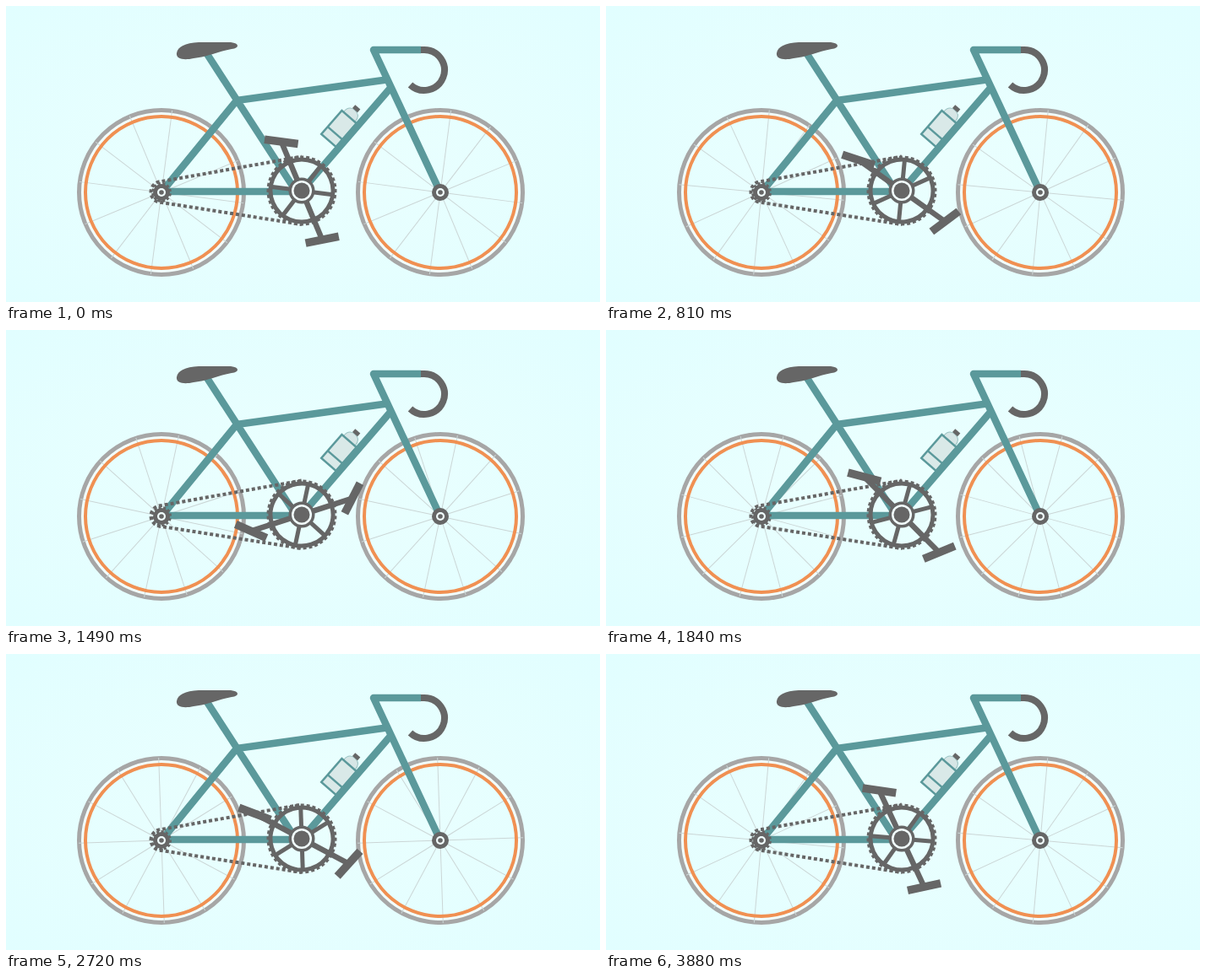
Animation of 703 by 351 pixels, one loop 3930 ms. Source, as an HTML page:

```html
<!DOCTYPE html>
<html lang="en">
<head>
<meta charset="utf-8">
<title>Bicycle</title>
<style>
  html, body { margin: 0; width: 100%; height: 100%; overflow: hidden; }
  body { background: radial-gradient(#ebfffe, #e1feff); }
  svg { display: block; width: 100%; height: 100%; fill: none; }
  .dark { stroke: #666; }
  .teal { stroke: #5b999b; stroke-width: 8.5; }
  .fill { fill: #666; }
  .pale { fill: #f2ffff; }
</style>
</head>
<body>
<svg viewBox="0 0 703 351">
  <defs>
    <g id="tyre">
      <circle r="93.5" stroke="#f2fffe" stroke-width="4"/>
      <circle r="97.5" stroke="#a6a6a6" stroke-width="5"/>
    </g>
    <circle id="rim" r="90" stroke="#f09052" stroke-width="4"/>
    <g id="hub">
      <circle class="fill" r="10"/>
      <circle class="pale" r="5"/>
      <circle class="fill" r="2.8"/>
    </g>
  </defs>

  <g id="rear" transform="translate(184 221)">
    <use href="#tyre"/><g class="spokes"></g><use href="#rim"/>
  </g>
  <g id="front" transform="translate(514 221)">
    <use href="#tyre"/><g class="spokes"></g><use href="#rim"/>
  </g>

  <g transform="translate(394 145.5) rotate(41)" stroke="#5b999b">
    <path d="M-9-19C-9-26-5-29 0-29S9-26 9-19Z" fill="#d6e6e6" stroke="#9cc3c3"/>
    <rect x="-11.5" y="-18.5" width="23" height="37" fill="#d9e9e8" stroke-width="2.5"/>
    <path d="M-12 7H12" stroke-width="2.5"/>
    <rect class="fill" x="-4" y="-34" width="8" height="5" stroke="none"/>
  </g>

  <g class="teal">
    <path d="M238 57L344 221M184 220H350M184 221L273 112L450 87.5M350 219L456 96"/>
    <path d="M491 52H435L514 221" stroke-linejoin="round"/>
  </g>
  <path class="dark" d="M491 52H495A24 24 0 1 1 478.5 93.5" stroke-width="8"/>
  <path class="fill" d="M202 56C203 48 212 44 228 43H266Q274 44 274 47Q274 50 267 51C250 54 240 60 222 62C209 65 201 62 202 56Z"/>

  <path id="chain" class="dark" d="M350 259L184 233A12.5 12.5 0 0 1 184 208L350 178.5" stroke-width="4" stroke-dasharray="4 2.98"/>
  <use href="#hub" x="514" y="221"/>
  <g transform="translate(184 221)">
    <circle id="cog" class="dark" r="10.5" stroke-width="3" stroke-dasharray="3 2.5" pathLength="66"/>
    <use href="#hub"/>
  </g>

  <g transform="translate(350 219)">
    <g id="crank" class="dark">
      <circle r="39.5" stroke-width="4" pathLength="252" stroke-dasharray="4 3"/>
      <circle r="37" stroke-width="5"/>
      <g id="arms" stroke-width="5"></g>
      <path d="M0-63V63" stroke-width="6.5"/>
    </g>
    <circle class="fill" r="15.5"/>
    <circle class="pale" r="12"/>
    <circle class="fill" r="9.5"/>
    <rect class="pedal fill" x="-20" y="-4.75" width="40" height="9.5"/>
    <rect class="pedal fill" x="-20" y="-4.75" width="40" height="9.5"/>
  </g>
</svg>
<script>
const LOOP = 3930, FIRST = 67, STEP = 48.85;
const START = -22.6, SPEED = 0.1851; // degrees, degrees per ms
const RAD = Math.PI / 180;
const $ = id => document.getElementById(id);
const spokes = [...document.querySelectorAll('.spokes')];
const pedals = [...document.querySelectorAll('.pedal')];

const rays = (count, from, to) => Array.from({ length: count }, (_, i) =>
  `<path d="M0 ${-from}V${-to}" transform="rotate(${i * 360 / count})"/>`).join('');

for (const g of spokes) {
  g.setAttribute('stroke', '#cbd6d6');
  g.innerHTML = rays(12, 8, 98);
}
$('arms').innerHTML = rays(6, 13, 37);

const turn = (el, angle) => el.setAttribute('transform', `rotate(${angle})`);

// Pedal tilt follows how far the arm leans forwards or backwards.
function tilt(angle) {
  const u = (angle % 360 + 360) % 360;
  const lean = 90 - Math.abs(u % 180 - 90);
  if (u >= 180) return lean / 3;
  return lean < 45 ? -lean / 2 : -22.5 - (lean - 45) * 1.5;
}

function draw(now) {
  const t = now % LOOP;
  const time = t < FIRST ? 0 : FIRST + STEP * Math.floor((t - FIRST) / STEP);
  const angle = START + SPEED * time;
  for (const g of spokes) turn(g, angle);
  turn($('crank'), angle);
  turn($('cog'), angle);
  $('chain').setAttribute('stroke-dashoffset', -40 * angle * RAD);
  pedals.forEach((pedal, i) => {
    const a = angle + 180 * i;
    const x = 63 * Math.sin(a * RAD), y = -63 * Math.cos(a * RAD);
    pedal.setAttribute('transform', `translate(${x} ${y}) rotate(${tilt(a)})`);
  });
}

const begin = performance.now();
function frame() {
  draw(performance.now() - begin);
  requestAnimationFrame(frame);
}
frame();
</script>
</body>
</html>
```
